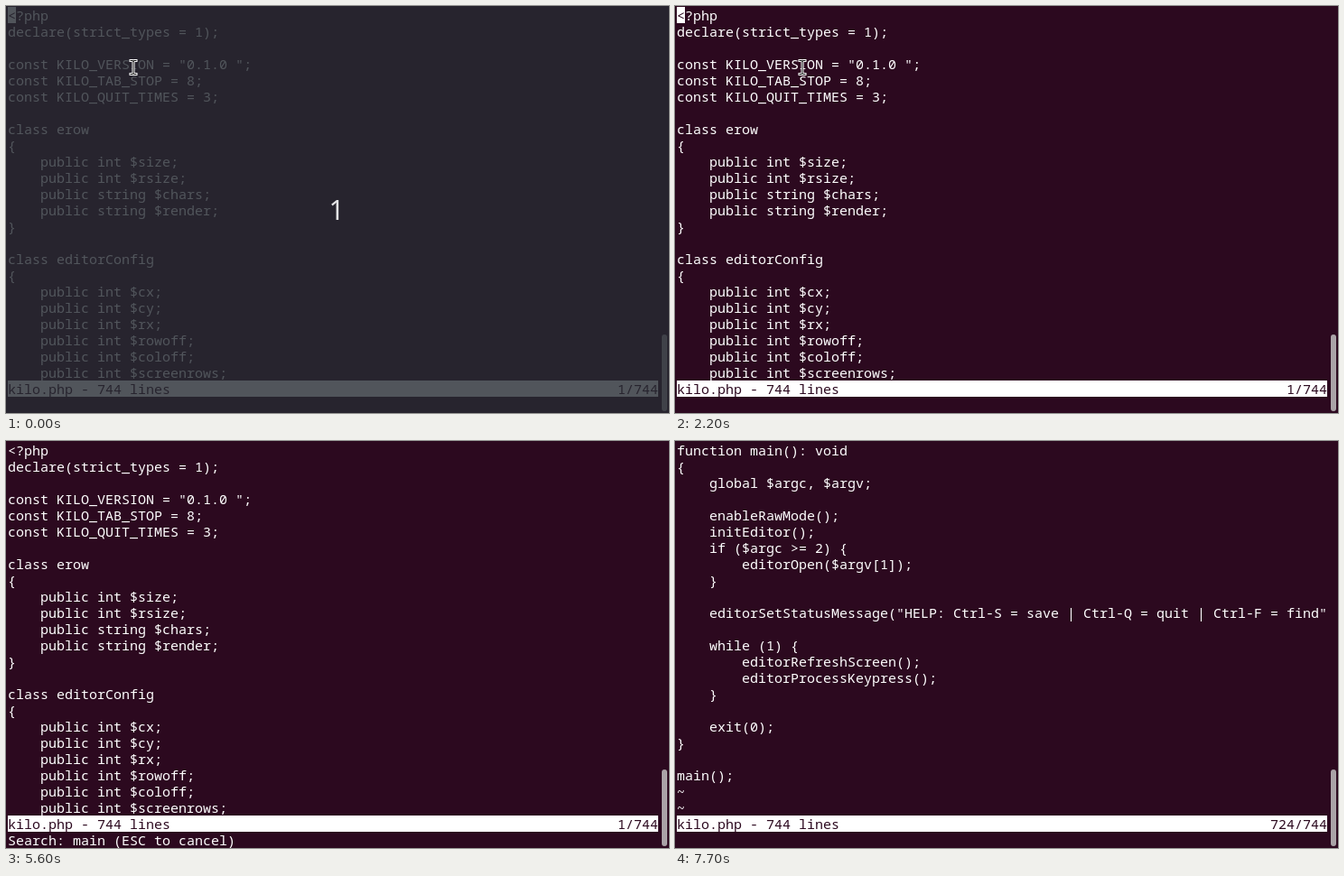
An HTML page with a canvas that plays this animation: 734 px wide and 451 px high, repeating every 8 s.

```html
<!DOCTYPE html>
<html lang="en">
<head>
<meta charset="utf-8">
<title>Terminal editor</title>
<style>
html, body { margin: 0; width: 100%; height: 100%; overflow: hidden; background: #2c091f; }
canvas { display: block; }
</style>
</head>
<body>
<canvas id="stage" width="734" height="451"></canvas>
<script>
const ctx = document.getElementById('stage').getContext('2d');
const LOOP = 8000, COLS = 80, CW = 9, CH = 18;
const BG = '#2c091f', FG = '#fff';

const topPage = `<?php
declare(strict_types = 1);

const KILO_VERSION = "0.1.0 ";
const KILO_TAB_STOP = 8;
const KILO_QUIT_TIMES = 3;

class erow
{
    public int $size;
    public int $rsize;
    public string $chars;
    public string $render;
}

class editorConfig
{
    public int $cx;
    public int $cy;
    public int $rx;
    public int $rowoff;
    public int $coloff;
    public int $screenrows;`.split('\n');

const mainPage = `function main(): void
{
    global $argc, $argv;

    enableRawMode();
    initEditor();
    if ($argc >= 2) {
        editorOpen($argv[1]);
    }

    editorSetStatusMessage("HELP: Ctrl-S = save | Ctrl-Q = quit | Ctrl-F = find"

    while (1) {
        editorRefreshScreen();
        editorProcessKeypress();
    }

    exit(0);
}

main();
~
~`.split('\n');

// Times at which the block cursor toggles, starting visible
const blinks = [400, 1200, 1800, 2200, 3300, 3900, 5600, 6000, 6500, 7100, 7700];
const keys = [4100, 4600, 4900, 5300];
const FIND = 3000, JUMP = 5900;

const passed = (times, t) => times.filter(x => t >= x).length;

function rect(color, x, y, w, h) {
  ctx.fillStyle = color;
  ctx.fillRect(x, y, w, h);
}

function print(text, col, row, color = FG) {
  ctx.fillStyle = color;
  ctx.fillText(text, 2 + col * CW, 16 + row * CH);
}

function block(col, row, width, color = FG) {
  rect(color, 2 + col * CW, 1 + row * CH, width * CW, CH);
}

function drawPointer() {
  const beam = new Path2D('M138 60.5h2q1 0 1 1q0-1 1-1h2M141 61v13M138 75.5h2q1 0 1-1q0 1 1 1h2');
  ctx.lineCap = 'square';
  ctx.strokeStyle = '#fff';
  ctx.lineWidth = 3;
  ctx.stroke(beam);
  ctx.strokeStyle = '#111';
  ctx.lineWidth = 1;
  ctx.stroke(beam);
}

function draw(t) {
  const found = t >= JUMP;
  const page = found ? mainPage : topPage;
  const col = found ? 9 : 0;

  rect(BG, 0, 0, 734, 451);
  ctx.font = '15px "Noto Sans Mono", "DejaVu Sans Mono", monospace';
  ctx.textAlign = 'left';
  page.forEach((line, row) => print(line, 0, row));

  if (passed(blinks, t) % 2 === 0) {
    block(col, 0, 1);
    print(page[0][col], col, 0, BG);
  }

  const place = found ? '724/744' : '1/744';
  block(0, 23, COLS);
  print('kilo.php - 744 lines', 0, 23, BG);
  print(place, COLS - place.length, 23, BG);

  if (t >= FIND && !found) {
    print(`Search: ${'main'.slice(0, passed(keys, t))} (ESC to cancel)`, 0, 24);
  }

  ctx.fillStyle = '#aaa3a7';
  ctx.beginPath();
  ctx.roundRect(726, 364, 6, 85, 3);
  ctx.fill();

  if (t < 100) {
    rect('rgba(38,43,50,.8)', 0, 0, 734, 451);
    ctx.font = '30px "Noto Sans", sans-serif';
    ctx.textAlign = 'center';
    ctx.fillStyle = '#e4e4e6';
    ctx.fillText('1', 366, 237);
  }
  if (t < 2700) drawPointer();
}

const start = performance.now();
function tick() {
  draw((performance.now() - start) % LOOP);
  requestAnimationFrame(tick);
}
tick();
</script>
</body>
</html>
```
